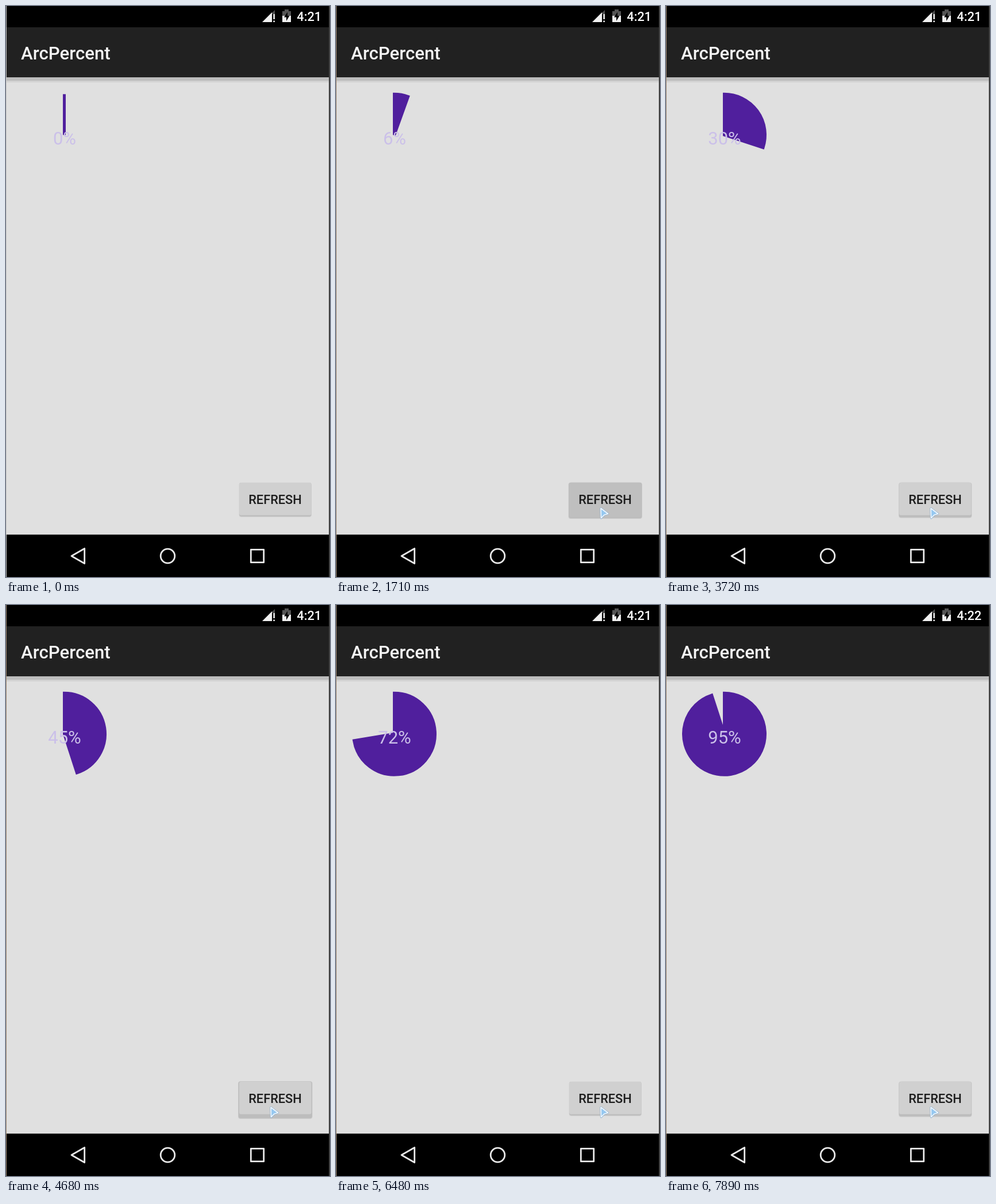
An HTML page for the animation above (8 s loop, 564 by 993 pixels).

```html
<!DOCTYPE html>
<html lang="en">
<head>
<meta charset="utf-8">
<title>ArcPercent</title>
<style>
  html, body { margin: 0; width: 100%; height: 100%; overflow: hidden; background: #e0e0e0; }
  svg { display: block; width: 564px; height: 993px; }
  text { font-family: Roboto, sans-serif; font-weight: 500; }
  #label { font-weight: 400; }
</style>
</head>
<body>
<svg viewBox="0 0 564 993">
  <rect width="564" height="993" fill="#e0e0e0"/>
  <rect y="124" width="564" height="9" fill="#d3d3d3"/>
  <rect y="124" width="564" height="6" fill="#bdbdbd"/>
  <rect width="564" height="37"/>
  <rect y="37" width="564" height="87" fill="#212121"/>
  <rect y="919.3" width="564" height="74"/>

  <!-- status bar -->
  <path d="M463 12L468 7V14H463Z" fill="#4c4c4c"/>
  <path d="M446 28L463 11V28ZM465.3 14h2.6v9h-2.6zM465.3 25.4h2.6v2.6h-2.6z" fill="#f0f0f0"/>
  <path d="M481 9h4V6h7v3h4v9h-15z" fill="#555"/>
  <path d="M481 17h15v11h-15z" fill="#f0f0f0"/>
  <path d="M490 10.5L484 19.5H488V26L493.5 17H490Z"/>
  <text id="clock" x="506.3" y="26" font-size="21.8" fill="#fff"></text>
  <text x="26" y="93.3" font-size="31.2" fill="#f4f4f4">ArcPercent</text>

  <!-- chart -->
  <path id="pie" fill="#501f9d" stroke="#501f9d" stroke-width="5"/>
  <text id="label" x="102" y="240.5" font-size="31" text-anchor="middle" fill="#cbc0e9"></text>

  <!-- button -->
  <rect id="halo" rx="4" fill="#d0d0d0"/>
  <rect id="shade" rx="4" fill="#bdbdbd"/>
  <rect id="face" x="406" y="829" width="125.5" rx="3"/>
  <text x="468.5" y="865.8" font-size="21.8" text-anchor="middle" fill="#1c1c1c">REFRESH</text>

  <!-- navigation -->
  <g fill="none" stroke="#e8e8e8" stroke-width="2.8" stroke-linejoin="round">
    <path d="M114 956.5L136.7 943.5V969.5Z"/>
    <circle cx="281.5" cy="956.5" r="12.3"/>
    <rect x="426.3" y="945.3" width="22.4" height="22.4"/>
  </g>

  <rect id="edge" width="1" height="993"/>
  <rect x="562" width="2" height="993" fill="#3e3e3e"/>

  <g id="cursor" stroke-linejoin="round">
    <path d="M461 873.5L473.5 883L467 885L461.5 890.5Z" fill="none" stroke="#8fb2d2" stroke-width="3.2"/>
    <path d="M461 873.5L473.5 883L467 885L461.5 890.5Z" fill="#96c8f0" stroke="#f4f9fd" stroke-width="1.6"/>
  </g>
</svg>
<script>
const LOOP = 8000, TICK = 30;
const STEP = 5, COUNT_MS = 167;
const CX = 101.5, CY = 224.3, R = 71;

// Runs of evenly spaced clicks: first click, how many, gap
const RUNS = [[1170, 2, 523], [2440, 2, 500], [3345, 2, 200], [3860, 3, 270], [4754, 10, 329]];
const CLICKS = RUNS.flatMap(([first, n, gap]) =>
  Array.from({ length: n }, (_, i) => first + i * gap));

const $ = id => document.getElementById(id);
const clamp01 = v => Math.min(1, Math.max(0, v));
const set = (id, attrs) => {
  for (const k in attrs) $(id).setAttribute(k, attrs[k]);
};

function percentAt(t) {
  return CLICKS.reduce((sum, c) => sum + STEP * clamp01((t - c) / COUNT_MS), 0);
}

// The button lifts, darkens on the click, drops, then settles.
function buttonAt(t) {
  const age = Math.min(...CLICKS.map(c => t - c).filter(a => a >= -80));
  const dark = age >= -30 && age < 40;
  if (age === Infinity) return { dark, level: 0 };
  return { dark, level: age < -30 ? 3 : dark ? 2 : age < 110 ? 0 : 1 };
}

function piePath(pct) {
  const top = `M${CX} ${CY}V${CY - R}`;
  if (!pct) return top;
  const a = pct / 50 * Math.PI;
  const x = CX + R * Math.sin(a), y = CY - R * Math.cos(a);
  return `${top}A${R} ${R} 0 ${pct > 50 ? 1 : 0} 1 ${x} ${y}Z`;
}

function drawButton({ dark, level }) {
  const grow = level / 2, bottom = 888 + level * 1.7;
  const box = (pad, end) => ({
    x: 406 - pad, y: 829 - pad / 3, width: 125.5 + 2 * pad, height: end - 829 + pad / 3
  });
  set('halo', box(grow + .5, bottom + .7));
  set('shade', box(grow, bottom - .3));
  set('face', { fill: dark ? '#bfbfbf' : '#d0d0d0', height: dark ? 59 : 56.5 });
}

function drawCursor(t) {
  const k = clamp01((t - 510) / 360);
  const left = 1 - k * k * (3 - 2 * k);
  set('cursor', {
    visibility: t < 30 ? 'hidden' : 'visible',
    transform: `translate(${-438 * left} ${-72 * left})`
  });
}

function render(time) {
  const t = Math.floor(time / TICK) * TICK;
  const pct = percentAt(t);
  set('pie', { d: piePath(pct) });
  $('label').textContent = Math.round(pct) + '%';
  $('clock').textContent = t < 7020 ? '4:21' : '4:22';
  set('edge', { fill: t < 540 ? '#c6c6c6' : '#a08a74' });
  drawButton(buttonAt(t));
  drawCursor(t);
}

const begin = performance.now();
function loop() {
  render((performance.now() - begin) % LOOP);
  requestAnimationFrame(loop);
}
render(0);
requestAnimationFrame(loop);
</script>
</body>
</html>
```
